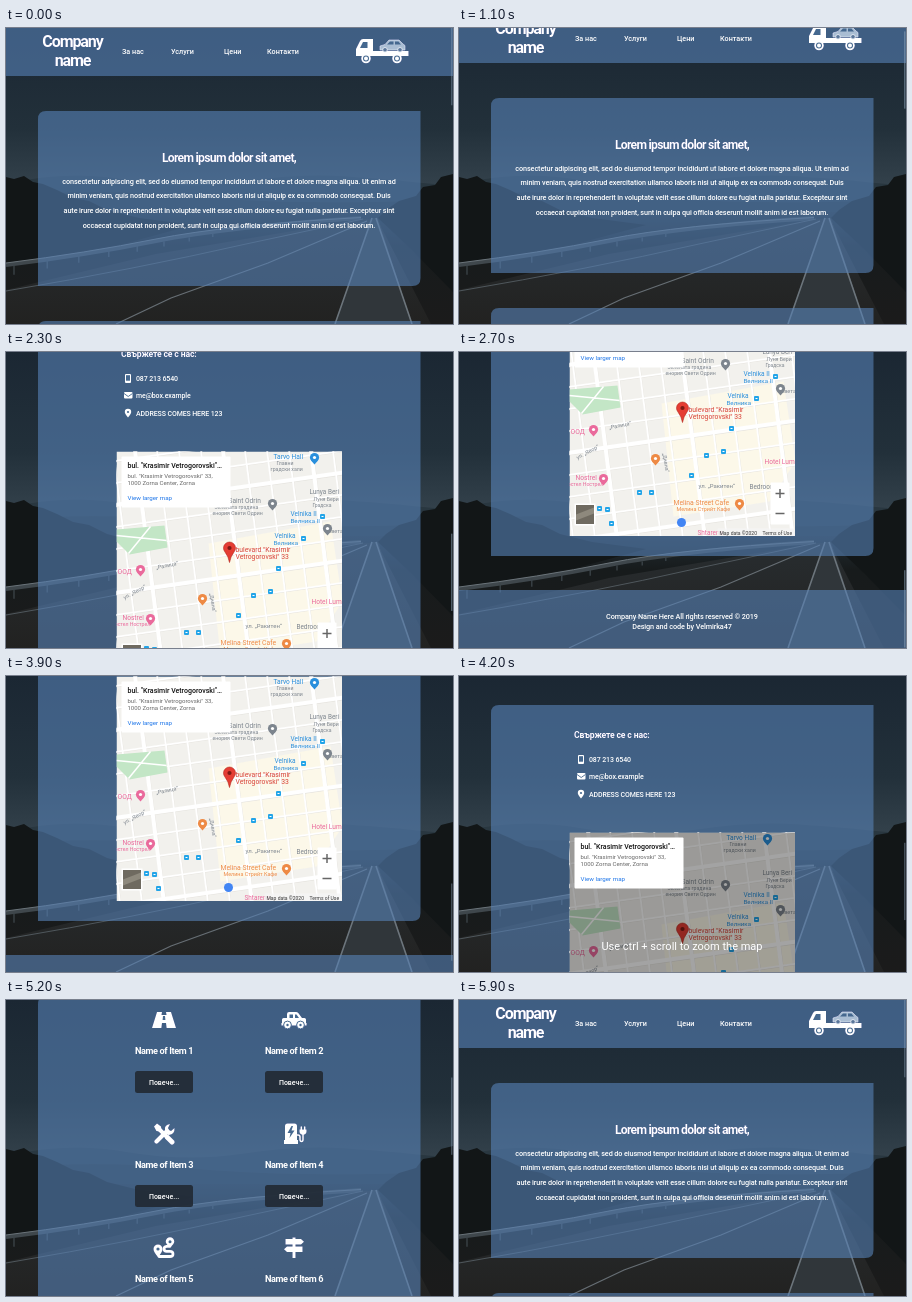
Recreate the animation shown at these times as an HTML page. Size 447 px wide and 296 px high, loop 8000 ms.

```html
<!DOCTYPE html>
<html lang="bg">
<head>
<meta charset="utf-8">
<title>Company name</title>
<style>
html, body { margin: 0; width: 100%; height: 100%; overflow: hidden; background: #1b252f; }
svg { display: block; position: absolute; left: 0; top: 0; }
text { font-family: Roboto, Arial, sans-serif; fill: #fff; white-space: pre; }
.glass { fill: #5783b8; fill-opacity: .6; }
.lift { filter: drop-shadow(.9px .9px 0 #2a3384); }
.icon { fill: #fff; stroke: none; }
.line { fill: none; stroke: #fff; stroke-linecap: round; stroke-linejoin: round; }
.hole { fill: #45688f; }
</style>
</head>
<body>
<svg id="stage" width="447" height="296" viewBox="0 0 447 296">
  <defs>
    <linearGradient id="sky" x1="0" y1="0" x2="0" y2="1">
      <stop offset="0" stop-color="#1b2733"/>
      <stop offset=".5" stop-color="#22303a"/>
      <stop offset=".8" stop-color="#34424c"/>
    </linearGradient>
    <linearGradient id="land" x1="0" y1="0" x2="0" y2="1">
      <stop offset="0" stop-color="#222c32"/>
      <stop offset=".3" stop-color="#171b1c"/>
      <stop offset="1" stop-color="#1b1b1b"/>
    </linearGradient>
    <linearGradient id="road" x1="0" y1="0" x2="0" y2="1">
      <stop offset="0" stop-color="#282d30"/>
      <stop offset="1" stop-color="#222221"/>
    </linearGradient>
    <clipPath id="mapBox"><rect width="225.500" height="224.500"/></clipPath>

    <g id="highway">
      <path class="icon" d="M-7-8h5l-.5 3h5L2-8h5l5 16H2.600l-.6-5h-4l-.6 5H-12z"/>
      <path class="hole" d="M-1-4h2l.4 4h-2.800z"/>
    </g>
    <g id="pickup">
      <path class="icon" d="M-5-8h7q1.500 0 2.500 1.300L8-2h2.500q1.500 0 1.500 1.500V3h.6v2.500H-12.600V3h.6v-3.500q0-1.500 1.500-1.500H-7v-4q0-2 2-2z"/>
      <path class="hole" d="M-4.500-5.500H-1V-2h-3.500zM1-5.500h1.500L5-2H1z"/>
      <g fill="#fff" stroke="#45688f"><circle cx="-6.500" cy="5" r="3.900"/><circle cx="6.500" cy="5" r="3.900"/></g>
      <g class="hole"><circle cx="-6.500" cy="5" r="1.200"/><circle cx="6.500" cy="5" r="1.200"/></g>
    </g>
    <g id="tools">
      <path class="line" stroke-width="4.200" d="M-7.500 7.500L3-3"/>
      <path class="icon" d="M1-4Q0-9 6-10L4-6l1 2 2 1 3.500-3Q11 0 5 1 2 1 1-4z"/>
      <path class="line" stroke="#45688f" stroke-width="4" d="M-5-5L3 3"/>
      <path class="line" stroke-width="2.200" d="M-6-6L2 2"/>
      <path class="icon" d="M-10-7.500l3-3 4 3 .4 3-2 2-3-.4z"/>
      <path class="line" stroke-width="5" d="M3.500 3.500L8 8"/>
    </g>
    <g id="charger">
      <path class="icon" d="M-9-8q0-2.500 2.500-2.500h7Q3-10.500 3-8V6h1v4h-14V6h1z"/>
      <path class="hole" d="M-2.500-8l-4 7h3l-1 5 5-7.500h-3l1.500-4.500z"/>
      <path class="line" stroke-width="1.500" d="M3 1h1q2 0 2 2v2.500q0 2 1.500 2T9 5.500V0M7.300-4v-3M10.700-4v-3"/>
      <path class="icon" d="M5.500-4.500h7v2q0 3-3.500 3.200-3.500-.2-3.500-3.200z"/>
    </g>
    <g id="route">
      <path class="line" stroke-width="2.800" d="M-5 8.500H6q3 0 3-2.600T6 3.300H2.500q-2.500 0-2.500-2.500 0-2 2.500-2.500H6"/>
      <path class="icon" d="M-6 9q-4.500-5-4.500-8a4.500 4.500 0 0 1 9 0q0 3-4.500 8zM6-.5Q1.700-4 1.700-6.500a4.300 4.300 0 0 1 8.600 0Q10.300-4 6-.5z"/>
      <g class="hole"><circle cx="-6" cy="1" r="1.600"/><circle cx="6" cy="-6.300" r="1.500"/></g>
    </g>
    <g id="signs">
      <path class="icon" d="M-1.500-10.500h3V-9H7l3 2.700-3 2.800H1.500V-1.500H8.500v5.500h-7v6h-3V4H-7l-3-2.700 3-2.800h5.500v-2H-8.500V-9h7z"/>
    </g>
  </defs>

  <g id="photo">
    <rect width="447" height="200" fill="url(#sky)"/>
    <path d="M0 156Q60 142 120 152T235 154 330 148 447 158V210H0z" fill="#293740"/>
    <path d="M0 168Q90 160 190 169T447 172V215H0z" fill="#242f36"/>
    <rect y="184" width="447" height="112" fill="url(#land)"/>
    <path d="M0 149l8 2 10-3 9 6 10 2 14 6 16 8 16 3 18 9 32 8 54 7-70 19L0 236z" fill="#121617"/>
    <path d="M447 146l-12 3-6 8-12 2-7 9-17 5-13 9-8 8 34 32 41 42z" fill="#121617"/>
    <path d="M0 262L150 226 358 191H371L425 296H0z" fill="url(#road)"/>
    <path d="M366 190L329 296H406L372 190z" fill="#30363a"/>
    <g fill="none">
      <path d="M0 237Q80 227 150 213T355 190" stroke-width="4" stroke="#3f474c"/>
      <path d="M0 235Q80 225 150 211T355 189.500" stroke-width="1" stroke="#6a7379"/>
      <path d="M0 263Q130 241 240 216L357 191" stroke-width="1" stroke="#4f575c"/>
      <path d="M361 193L262 235 165 270 110 296" stroke-width="1.200" stroke="#666e74"/>
      <path d="M366 190L329 296M370 190L406 296" stroke-width="1.600" stroke="#6c757c"/>
    </g>
    <g id="posts" stroke="#3d454a" stroke-width="1.300"></g>
  </g>

  <g id="page">
    <rect class="glass" width="447" height="48"/>
    <g id="cards" class="glass"></g>
    <rect class="glass" y="1074" width="447" height="60"/>
    <g id="truck" class="lift">
      <path class="icon" d="M350 31V21l4-8q1-2 3-2h10v12h35.500v5H350z"/>
      <path class="hole" d="M354 20l3-6h4.500v6z"/>
      <path d="M374 22v-4l5-1.500 4-4.500h10l4 4 2 1.500V22z" fill="#a9bdd3" stroke="#dbe5f0" stroke-width=".7"/>
      <path class="hole" d="M381 16.500l3-3h3.500v3zM389 13.500h3.500l2.500 3H389z"/>
      <g fill="#5a779b" stroke="#e8eef5" stroke-width=".9"><circle cx="379" cy="21.800" r="2.300"/><circle cx="394" cy="21.800" r="2.300"/></g>
      <g fill="#45688f" stroke="#fff" stroke-width="1.800"><circle cx="360" cy="30.500" r="3.900"/><circle cx="391" cy="30.500" r="3.900"/></g>
      <g class="icon"><circle cx="360" cy="30.500" r="2"/><circle cx="391" cy="30.500" r="2"/></g>
    </g>
    <g id="titles" class="lift"></g>
    <g id="copy"></g>
    <g id="items"></g>
    <g class="icon">
      <rect x="119" y="718" width="6" height="9" rx="1"/>
      <rect class="hole" x="120" y="719.200" width="4" height="5.500"/>
      <rect x="118" y="736" width="8.500" height="6.500" rx="1"/>
      <path d="M118 737.500l4.200 3 4.300-3" fill="none" stroke="#45688f" stroke-width=".9"/>
      <path d="M122 761.500q-3.200-3.600-3.200-5.500a3.200 3.200 0 0 1 6.400 0q0 1.900-3.200 5.500z"/>
      <circle class="hole" cx="122" cy="756" r="1.100"/>
    </g>
    <g transform="translate(110.500 795.500)">
      <g clip-path="url(#mapBox)">
        <rect width="226" height="225" fill="#f2f1ed"/>
        <path d="M92 92L214 70 226 150 200 190 104 205z" fill="#fcf8e9"/>
        <g id="streets" fill="none" stroke="#fff"></g>
        <path d="M0 78l48-4 3 22-38 7-13-13z" fill="#c3e6c6"/>
        <path d="M0 84l50 5M12 102l22-27" stroke="#fff" stroke-width="1.500"/>
        <g id="places"></g>
        <rect x="148" y="217" width="78" height="8" fill="#f5f5f5" fill-opacity=".8"/>
        <g id="credits"></g>
        <circle cx="112" cy="211" r="4.500" fill="#4285f4"/>
        <rect x="5" y="192" width="21" height="22" fill="#fff"/>
        <rect x="6.500" y="193.500" width="18" height="19" fill="#6f6a60"/>
        <path d="M6.500 203l18-7v6l-18 7z" fill="#8e897d"/>
        <rect x="201" y="171" width="19" height="42" rx="1" fill="#fff"/>
        <path d="M206 182h9M210.500 177.500v9M206 202h9" stroke="#666" stroke-width="1.500"/>
        <path d="M113 111q-1-6-4.500-10.500a6 6 0 1 1 9 0Q114 105 113 111z" fill="#e53d33" stroke="#b3261e" stroke-width=".6"/>
        <circle cx="113" cy="96.500" r="2.100" fill="#7d1a14"/>
        <rect id="veil" width="226" height="225"/>
        <g id="hint"></g>
        <rect x="5" y="5" width="109" height="51" rx="1" fill="#fff"/>
        <g id="info"></g>
      </g>
    </g>
  </g>
  <rect id="thumb" x="445" width="1.500" fill="#8ea3ba"/>
</svg>
<script>
const $ = id => document.getElementById(id);
const VIEW = 296, PAGE = 1134, LOOP = 8000, STEP = 100;

function label(str, x, y, size, o = {}) {
  const turn = o.turn ? ` transform="rotate(${o.turn} ${x} ${y})"` : '';
  return `<text x="${x}" y="${y}" text-anchor="${o.at || 'start'}"${turn} style="font-size:${size}px;` +
    `font-weight:${o.w || 400};letter-spacing:${o.gap || 0}px;fill:${o.c || '#fff'}">${str}</text>`;
}
const mid = (str, x, y, size, o) => label(str, x, y, size, { at: 'middle', ...o });
const bold = { w: 700 }, medium = { w: 500 }, tight = { w: 500, gap: -.11 };

// Cards are rounded at the top left and bottom right only.
const card = (y, h) => `<path d="M32 ${y + 8}q0-8 8-8h374.500v${h - 8}q0 8-8 8H32z"/>`;
$('cards').innerHTML = card(83, 175) + card(293, 340) + card(668, 372);

$('titles').innerHTML =
  mid('Company', 66.500, 19, 16, { ...bold, gap: -1.1 }) +
  mid('name', 66.500, 38, 16, { ...bold, gap: -1.1 }) +
  mid('Lorem ipsum dolor sit amet,', 223, 134, 12.2, { ...bold, gap: -.72 }) +
  label('Свържете се с нас:', 115, 701, 8.7, { ...bold, gap: -.18 });

const nav = [['За нас', 116], ['Услуги', 165], ['Цени', 218], ['Контакти', 261]];
const lorem = [
  'consectetur adipiscing elit, sed do eiusmod tempor incididunt ut labore et dolore magna aliqua. Ut enim ad',
  'minim veniam, quis nostrud exercitation ullamco laboris nisi ut aliquip ex ea commodo consequat. Duis',
  'aute irure dolor in reprehenderit in voluptate velit esse cillum dolore eu fugiat nulla pariatur. Excepteur sint',
  'occaecat cupidatat non proident, sunt in culpa qui officia deserunt mollit anim id est laborum.'
];
const contact = ['087 213 6540', 'me@box.example', 'ADDRESS COMES HERE 123'];
$('copy').innerHTML =
  nav.map(([s, x]) => label(s, x, 26, 7.2, medium)).join('') +
  lorem.map((s, i) => mid(s, 223, 155.5 + i * 14.9, 7.25, tight)).join('') +
  contact.map((s, i) => label(s, 130, 725 + i * 17.4, 7, tight)).join('') +
  mid('Company Name Here All rights reserved © 2019', 223, 1102.5, 7.3, tight) +
  mid('Design and code by Velmirka47', 223, 1112.5, 7.3, tight);

$('items').innerHTML = ['highway', 'pickup', 'tools', 'charger', 'route', 'signs'].map((id, i) => {
  const x = i % 2 ? 288 : 158, y = 317 + (i >> 1) * 114;
  return `<use href="#${id}" x="${x}" y="${y}" class="lift"/>` +
    mid('Name of Item ' + (i + 1), x, y + 34, 9.2, { ...bold, gap: -.4 }) +
    `<rect x="${x - 29}" y="${y + 51}" width="58" height="22" rx="2.500" fill="#222b35" fill-opacity=".93"/>` +
    mid('Повече...', x, y + 64.5, 7, medium);
}).join('');

let posts = '';
for (let i = 0; i < 8; i++) {
  const x = 8 + i * 34 - i * i * .8, y = 238 - x * .155;
  posts += `<path d="M${x} ${y}v${10 - i}"/>`;
}
$('posts').innerHTML = posts;

// Map streets: two slightly tilted families with a few wide avenues.
let streets = '';
for (let i = 0; i < 13; i++) {
  const p = i * 22 - 12, w = i % 4 === 2 ? 4 : 1.8;
  streets += `<path stroke-width="${w}" d="M-5 ${p + 22}L235 ${p - 12}"/>` +
    `<path stroke-width="${w}" d="M${p - 14} -5L${p + 16} 230"/>`;
}
$('streets').innerHTML = `<g stroke="#e6e4df" transform="translate(.4 .5)">${streets}</g>${streets}`;

const GREY = '#7d858e', BLUE = '#2a8fdc', PINK = '#ea6a9c', ORANGE = '#ee8a45', RED = '#d8433a';
const places = [
  ['Tarvo Hall', 157, 7, 6.6, BLUE], ['Главни', 160, 13, 5.2, GREY], ['градски хали', 154, 19, 5.2, GREY],
  ['Lunya Beri', 193, 42, 6.4, GREY], ['Луня Бери', 197, 49, 5.2, GREY], ['Градска', 196, 55.5, 5, GREY],
  ['Saint Odrin', 112, 51, 6.6, GREY], ['Зелената градина', 98, 57, 5.2, GREY], ['енория Свети Одрин', 96, 63, 5.2, GREY],
  ['Velnika II', 174, 64, 6.5, BLUE], ['Велника II', 174, 71, 6.2, BLUE],
  ['Velnika', 158, 86, 6.5, BLUE], ['Велника', 157, 93, 6.2, BLUE],
  ['Света', 211, 81, 5.6, GREY],
  ['bulevard "Krasimir', 119, 100, 6.8, RED], ['Vetrogorovski" 33', 119, 107.5, 6.8, RED],
  ['ООД', 1, 122, 6.8, PINK], ['Hotel Luma', 195, 152, 6.6, PINK],
  ['Nostrel', 6, 168, 6.6, PINK], ['Хостел Нострел', -5, 174, 5.2, PINK],
  ['ул. „Ракитен“', 129, 176, 6, GREY], ['Bedroom', 180, 177, 6.4, GREY],
  ['Melina Street Cafe', 104, 193, 6.8, ORANGE], ['Мелина Стрийт Кафе', 107, 199, 5.4, ORANGE],
  ['Shtarena', 128, 223, 6.4, PINK],
  ['„Ралица“', 40, 118, 5.4, GREY, -12], ['ул. „Явор“', 8, 148, 5.4, GREY, -28], ['„Дивна“', 93, 142, 5.2, GREY, 80]
];
const pins = [[198, 6, BLUE], [156, 52, GREY], [211, 77, GREY], [24, 118, PINK], [34, 167, PINK], [86, 147, ORANGE], [170, 192, ORANGE]];
const stops = [[122, 164], [137, 144], [70, 181], [82, 181], [42, 212], [30, 197], [38, 198], [162, 117], [154, 140], [206, 65], [187, 87]];
$('places').innerHTML =
  places.map(([s, x, y, z, c, turn]) => label(s, x, y, z, { c, turn })).join('') +
  pins.map(([x, y, c]) => `<path d="M${x} ${y + 7}l-3.500-4h7z" fill="${c}"/><circle cx="${x}" cy="${y}" r="4.600" fill="${c}"/>` +
    `<circle cx="${x}" cy="${y}" r="1.600" fill="#fff"/>`).join('') +
  stops.map(([x, y]) => `<rect x="${x - 2.5}" y="${y - 2.5}" width="5" height="5" rx="1" fill="#22a4e8"/>` +
    `<path d="M${x - 1} ${y}h2" stroke="#fff"/>`).join('');
$('credits').innerHTML =
  label('Map data ©2020', 150, 223, 5, { c: '#333' }) + label('Terms of Use', 193, 223, 5, { c: '#333' });
$('hint').innerHTML = mid('Use ctrl + scroll to zoom the map', 112.5, 117, 11);
$('info').innerHTML =
  label('bul. "Krasimir Vetrogorovski"…', 11, 16, 7, { c: '#111', w: 500 }) +
  label('bul. "Krasimir Vetrogorovski" 33,', 11, 26.5, 6, { c: '#666' }) +
  label('1000 Zorna Center, Zorna', 11, 33.5, 6, { c: '#666' }) +
  label('View larger map', 11, 48.5, 6.2, { c: '#1a73e8' });

// Keys are [ms, value], linear in between.
const scroll = [
  [0, 0], [1000, 0], [1100, 13], [1200, 45], [1400, 98], [1500, 98], [1600, 160], [1800, 351],
  [2400, 765], [2500, 800], [2700, 836], [2800, 838], [3800, 838], [3900, 795], [4200, 639],
  [4300, 636], [4400, 618], [4600, 530], [5200, 297], [5600, 75], [5700, 32], [5800, 8], [5900, 0], [LOOP, 0]
];
const dim = [[0, 0], [3900, 0], [4200, 1], [4500, 1], [4900, 0], [LOOP, 0]];
const glow = [[0, .4], [1000, .4], [1100, .5], [2900, .5], [3200, .4], [LOOP, .4]];

function at(keys, t) {
  const i = keys.findIndex(k => k[0] > t);
  const [t0, a] = keys[i - 1], [t1, b] = keys[i];
  return a + (b - a) * (t - t0) / (t1 - t0);
}

function draw(now) {
  const t = Math.floor(now % LOOP / STEP) * STEP;
  const y = at(scroll, t), shade = at(dim, t), thumb = $('thumb');
  $('page').setAttribute('transform', `translate(0 ${-y})`);
  $('veil').setAttribute('opacity', shade * .36);
  $('hint').setAttribute('opacity', shade);
  thumb.setAttribute('y', y / PAGE * VIEW);
  thumb.setAttribute('height', VIEW * VIEW / PAGE);
  thumb.setAttribute('opacity', at(glow, t));
}

const start = performance.now();
function tick() {
  draw(performance.now() - start);
  requestAnimationFrame(tick);
}
tick();
</script>
</body>
</html>
```
